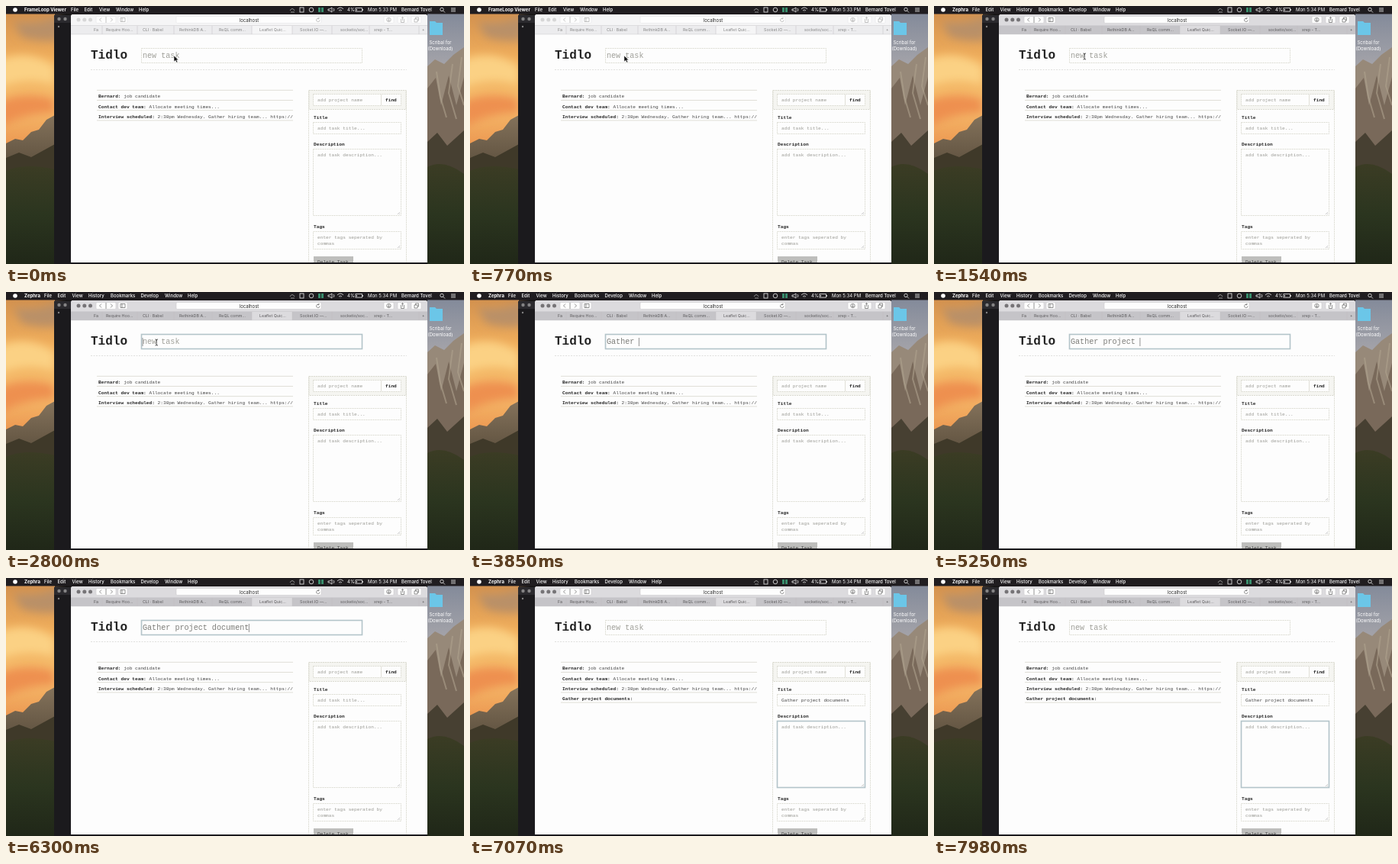
These frames come from a looping animation (600x338 px, 8000 ms). An HTML page:

```html
<!DOCTYPE html>
<html lang="en">
<head>
<meta charset="utf-8">
<title>Task list</title>
<style>
  html, body { margin: 0; width: 100%; height: 100%; overflow: hidden; background: #141313; }
  svg { display: block; width: 100vw; height: 100vh; }
  text { white-space: pre; }
  .ui { font: 6px Inter, "Liberation Sans", sans-serif; }
  .mono { font: 6.16px "Liberation Mono", monospace; fill: #444; }
  .bold { font-weight: 700; fill: #222; }
  .hint { fill: #9a9a94; }
  .box { fill: #fdfdfd; stroke: #d9d8cf; stroke-width: .9; stroke-dasharray: 2 1; }
  .focus { stroke: #b3c4c9; stroke-width: 1.6; stroke-dasharray: none; }
  .rule { stroke: #dddcd3; stroke-width: .9; }
</style>
</head>
<body>
<svg viewBox="0 0 600 338" preserveAspectRatio="none">
  <defs>
    <linearGradient id="sky" x2="0" y2="1">
      <stop offset="0" stop-color="#cf8d4c"/><stop offset=".35" stop-color="#f0ae5c"/>
      <stop offset=".65" stop-color="#f6bd6c"/><stop offset="1" stop-color="#e98b48"/>
    </linearGradient>
    <linearGradient id="dusk" x2="0" y2="1">
      <stop offset="0" stop-color="#7f8798"/><stop offset="1" stop-color="#b3afb0"/>
    </linearGradient>
    <linearGradient id="cliff" x2="0" y2="1">
      <stop offset="0" stop-color="#84725b"/><stop offset="1" stop-color="#4a4030"/>
    </linearGradient>
    <linearGradient id="forest" x2="0" y2="1">
      <stop offset="0" stop-color="#3b3c24"/><stop offset=".5" stop-color="#2b351f"/>
      <stop offset="1" stop-color="#202718"/>
    </linearGradient>
    <filter id="soft"><feGaussianBlur stdDeviation="6"/></filter>
    <clipPath id="page"><rect x="85" y="37" width="467" height="299"/></clipPath>
  </defs>

  <g id="desktop">
    <rect width="64" height="200" fill="url(#sky)"/>
    <g filter="url(#soft)">
      <path d="M10 20Q40 25 70 12V44Q45 48 20 40Z" fill="#b99068"/>
      <path d="M-10 72Q25 55 64 78V104Q25 92-10 108Z" fill="#fbd184"/>
      <path d="M-10 125Q25 110 64 122V140Q25 140-10 160Z" fill="#ee9050"/>
    </g>
    <path d="M0 180L12 174 22 176 33 165 43 162 53 149 64 143V245H0Z" fill="url(#cliff)"/>
    <path d="M0 199L17 192 33 198 64 181V245H0Z" fill="#3f3929"/>
    <path d="M0 216Q24 205 64 214V338H0Z" fill="url(#forest)"/>

    <rect x="552" width="48" height="110" fill="url(#dusk)"/>
    <path d="M552 79L562 70 574 76 586 64 600 54V220H552Z" fill="#978979"/>
    <path d="M552 108L563 94 570 130 580 91 590 130 600 93V205H552Z" fill="#79695a"/>
    <path d="M564 86L569 119 577 146M585 76L580 114 590 148M597 67L592 105 600 130" fill="none" stroke="#b0a28e" stroke-width="2" opacity=".6"/>
    <path d="M552 178L565 166 578 183 600 163V338H552Z" fill="#474032"/>
    <path d="M552 211Q573 200 600 220V338H552Z" fill="url(#forest)"/>
    <path d="M555 38V20H562L564 22H572V38Z" fill="#6bc6e8"/>
    <g class="ui" fill="#fff" text-anchor="middle">
      <text x="569" y="50">Scribal for</text><text x="569" y="58">(Download)</text>
    </g>
    <rect x="63" y="12" width="489" height="326" fill="#1b1a1d"/>
    <rect x="63" y="12" width="24" height="10" fill="#2b2a2e"/>
    <g fill="#848384"><circle cx="69.5" cy="17" r="2.2"/><circle cx="77.5" cy="17" r="2.2"/><circle cx="69" cy="27" r="1.2"/></g>
  </g>

  <g id="menubar">
    <rect width="600" height="10.5" fill="#201d20"/>
    <circle cx="12" cy="5" r="2.8" fill="#fff"/>
    <g id="menus" class="ui" fill="#fff"></g>
    <g fill="none" stroke="#eee" stroke-width=".8">
      <path d="M372 6Q375 1 378 6M373 8H378" stroke="#aaa"/>
      <rect x="385" y="2" width="5" height="6"/><circle cx="400" cy="5" r="2.8"/>
      <path d="M422 4H424L427 2V8L424 6H422ZM429 3Q431 5 429 7"/>
      <path d="M434 4Q438 0 442 4M436 6Q438 4 440 6M438 7.5V8"/>
      <rect x="458" y="2.7" width="8.5" height="4.4"/><path d="M459.5 4V6M467.5 4V6"/>
      <circle cx="571" cy="4.5" r="2.2"/><path d="M572.7 6.2L575 8.5M583 3H589M583 5H589M583 7H589"/>
    </g>
    <path d="M409 2H412V8H409ZM413 2H416V8H413Z" fill="#398d6c"/>
    <g class="ui" fill="#fff">
      <text x="447" y="7.2">4%</text><text id="clock" x="474" y="7.2"></text>
      <text x="518" y="7.2" font-weight="500">Bernard Tovel</text>
    </g>
  </g>

  <g id="browser">
    <path d="M85 336V14Q85 11 88 11H549Q552 11 552 14V336Z" fill="#fdfdfd"/>
    <path id="toolbar" d="M85 25.5V14Q85 11 88 11H549Q552 11 552 14V25.5Z"/>
    <g id="lights"><circle cx="95" cy="18" r="2.5"/><circle cx="102.8" cy="18" r="2.5"/><circle cx="110.5" cy="18" r="2.5"/></g>
    <g id="fields" fill="#fdfdfd" stroke-width=".5">
      <rect x="118" y="13.5" width="26" height="9" rx="1.5"/><rect x="147" y="13.5" width="12" height="9" rx="1.5"/>
      <rect x="223" y="13.5" width="190" height="9" rx="1.5"/>
      <rect x="495" y="13.5" width="13" height="9" rx="1.5"/><rect x="513" y="13.5" width="13" height="9" rx="1.5"/>
      <rect x="531" y="13.5" width="13" height="9" rx="1.5"/>
    </g>
    <g id="icons" fill="none" stroke-width=".7">
      <path d="M125 15.5L122.5 18 125 20.5M137 15.5L139.5 18 137 20.5M131 14V22"/>
      <path d="M150 15.5H156V20.5H150ZM152 15.5V20.5"/>
      <path d="M410 16.5A2.2 2.2 0 1 0 411 18.5M410 14.8V16.7H408"/>
      <circle cx="501.5" cy="18" r="2.7"/><path d="M501.5 16V20M500 18.5L501.5 20 503 18.5"/>
      <path d="M517.5 17V21.5H521.5V17M519.5 19V14.5M518 16L519.5 14.5 521 16"/>
      <path d="M535 17H539V21H535ZM536.5 17V15H540.5V19H539"/>
    </g>
    <text class="ui" x="318.5" y="20.5" text-anchor="middle" fill="#292929">localhost</text>
    <rect id="tabbar" x="85" y="25.5" width="467" height="11.5"/>
    <rect id="tab" x="322" y="25.5" width="53" height="11.5"/>
    <g id="tabs" class="ui" style="font-size:5.3px"></g>
    <path d="M85 37H552M85 25.5H552" stroke="#c6c5c9" stroke-width=".5"/>
  </g>

  <g clip-path="url(#page)">
    <text class="mono bold" x="111" y="69" style="font-size:16px">Tidlo</text>
    <rect id="entryBox" class="box" x="177.5" y="55.5" width="289" height="19"/>
    <text id="entry" class="mono" x="179" y="68" style="font-size:10.1px"></text>
    <path id="caret" d="M0 60V71" stroke="#777" stroke-width=".8"/>
    <path d="M111 83.5H525" stroke="#d9d9d6" stroke-width=".8" stroke-dasharray="2 1.5"/>
    <path class="rule" d="M119 110.3H376"/>
    <g id="tasks"></g>

    <rect class="box" x="396.5" y="110.5" width="128" height="235"/>
    <rect class="box" x="397" y="110.5" width="127" height="25" style="fill:#f5f5f1"/>
    <rect class="box" x="402.5" y="115.5" width="115" height="15"/>
    <path class="rule" d="M491.5 116V130"/>
    <rect class="box" x="402.5" y="152.5" width="115" height="15"/>
    <rect id="description" class="box" x="402.5" y="187.5" width="115" height="87"/>
    <rect class="box" x="402.5" y="295.5" width="115" height="23"/>
    <path d="M513 273L516 270M515 273L516 272M513 317L516 314M515 317L516 316" stroke="#aaa" stroke-width=".6"/>
    <text class="mono bold" x="497" y="125">find</text>
    <text class="mono bold" x="403" y="148">Title</text>
    <text class="mono bold" x="403" y="183">Description</text>
    <text class="mono bold" x="403" y="291">Tags</text>
    <text class="mono hint" x="408" y="125">add project name</text>
    <text class="mono hint" x="408" y="197">add task description...</text>
    <text class="mono hint" x="408" y="305">enter tags seperated by</text>
    <text class="mono hint" x="408" y="313">commas</text>
    <text id="title" x="408" y="162"></text>
    <rect x="403" y="328" width="52" height="12" fill="#bebebc"/>
    <text class="mono" x="408" y="337">Delete Task</text>
  </g>

  <path id="arrow" d="M0 0V8L2 6.2 3.3 9 4.8 8.3 3.5 5.7H6Z" fill="#111" stroke="#fff" stroke-width=".5"/>
  <path id="beam" d="M195.5 62Q197.2 62 197.2 63.2Q197.2 62 199 62M197.2 63V69M195.5 70Q197.2 70 197.2 69Q197.2 70 199 70" fill="none" stroke="#222" stroke-width=".8"/>
</svg>

<script>
const $ = id => document.getElementById(id);
const LOOP = 8000, ACTIVATE = 1050, FOCUS = 2030, SUBMIT = 7000;
const PHRASE = "Gather project documents";
// Each word: start time, end time, characters typed by then.
const typing = [[2900, 3780, 7], [4020, 5180, 15], [5320, 6270, 23], [6380, 6480, 24]];

const viewerMenu = [[24, "FrameLoop Viewer"], [85, "File"], [102.5, "Edit"], [122, "View"], [144, "Window"], [174, "Help"]];
const browserMenu = [[24, "Zephra"], [50, "File"], [67.5, "Edit"], [86.5, "View"], [108, "History"],
  [137, "Bookmarks"], [176.5, "Develop"], [208, "Window"], [238, "Help"]];
const tabs = [[115, "Fa"], [131, "Require Hoo..."], [179, "CLI · Babel"], [227, "RethinkDB A..."], [279, "ReQL comm..."],
  [332, "Leaflet Quic..."], [385, "Socket.IO —..."], [438, "socketio/soc..."], [482, "xrep - T..."], [545, "+"]];
const tasks = [["Bernard:", "job candidate"], ["Contact dev team:", "Allocate meeting times..."],
  ["Interview scheduled:", "2:30pm Wednesday. Gather hiring team... https://"], [PHRASE + ":", ""]];

// Window chrome when the browser is in the background and in front.
const background = { menu: viewerMenu, clock: "Mon 5:33 PM", bar: "#f5f5f6", tabbar: "#ececee", lights: "#d6d6d6",
  ink: "#aaa", edge: "#e3e3e4", label: "#858585" };
const foreground = { menu: browserMenu, clock: "Mon 5:34 PM", bar: "#dcdbde", tabbar: "#c5c4c8", lights: "#767477",
  ink: "#666", edge: "#c8c7ca", label: "#5c5b5d" };

const menuMarkup = items => items.map(([x, label], i) =>
  `<text x="${x}" y="7.2" font-weight="${i ? 500 : 700}">${label}</text>`).join("");
$("tabs").innerHTML = tabs.map(([x, label]) => `<text x="${x}" y="33">${label}</text>`).join("")
  + [126, 172, 220, 270, 322, 375, 427, 476, 541].map(x => `<path d="M${x} 26V37" stroke="#c0bfc3" stroke-width=".5"/>`).join("");
$("tasks").innerHTML = tasks.map(([name, note], i) => `<g>
  <text class="mono" x="121" y="${120.4 + 13.2 * i}"><tspan class="bold">${name}</tspan> ${note}</text>
  <path class="rule" d="M119 ${123.5 + 13.2 * i}H376"/></g>`).join("");

const show = (id, visible) => $(id).style.display = visible ? "" : "none";
const fill = (id, color) => $(id).setAttribute("fill", color);
const clamp = value => Math.max(0, Math.min(1, value));

function typedCount(t) {
  let count = 0;
  for (const [start, end, last] of typing) {
    count += Math.ceil((last - count) * clamp((t - start) / (end - start)));
    if (t < end) break;
  }
  return count;
}

let chrome;
function setChrome(next) {
  if (next === chrome) return;
  chrome = next;
  $("menus").innerHTML = menuMarkup(chrome.menu);
  $("clock").textContent = chrome.clock;
  fill("toolbar", chrome.bar);
  fill("tab", chrome.bar);
  fill("tabbar", chrome.tabbar);
  fill("lights", chrome.lights);
  fill("tabs", chrome.label);
  $("icons").setAttribute("stroke", chrome.ink);
  $("fields").setAttribute("stroke", chrome.edge);
}

function render(t) {
  const active = t >= ACTIVATE;
  const submitted = t >= SUBMIT;
  const focused = t >= FOCUS && !submitted;
  const typed = submitted ? 0 : typedCount(t);
  setChrome(active ? foreground : background);

  $("entryBox").setAttribute("class", focused ? "box focus" : "box");
  $("entry").textContent = typed ? PHRASE.slice(0, typed) : "new task";
  $("entry").style.fill = typed ? "#7d7d79" : "#a0a09a";
  show("caret", focused);
  $("caret").setAttribute("transform", `translate(${179 + typed * 6.06} 0)`);

  $("tasks").lastElementChild.style.display = submitted ? "" : "none";
  $("title").textContent = submitted ? PHRASE : "add task title...";
  $("title").setAttribute("class", submitted ? "mono" : "mono hint");
  $("description").setAttribute("class", submitted ? "box focus" : "box");

  const glide = clamp((t - 350) / 600);
  const eased = glide * glide * (3 - 2 * glide);
  $("arrow").setAttribute("transform", `translate(${220 - 23 * eased} 65)`);
  show("arrow", !active);
  show("beam", active && !typed && !submitted);
}

function frame(now) {
  render(now % LOOP);
  requestAnimationFrame(frame);
}
render(0);
requestAnimationFrame(frame);
</script>
</body>
</html>
```
